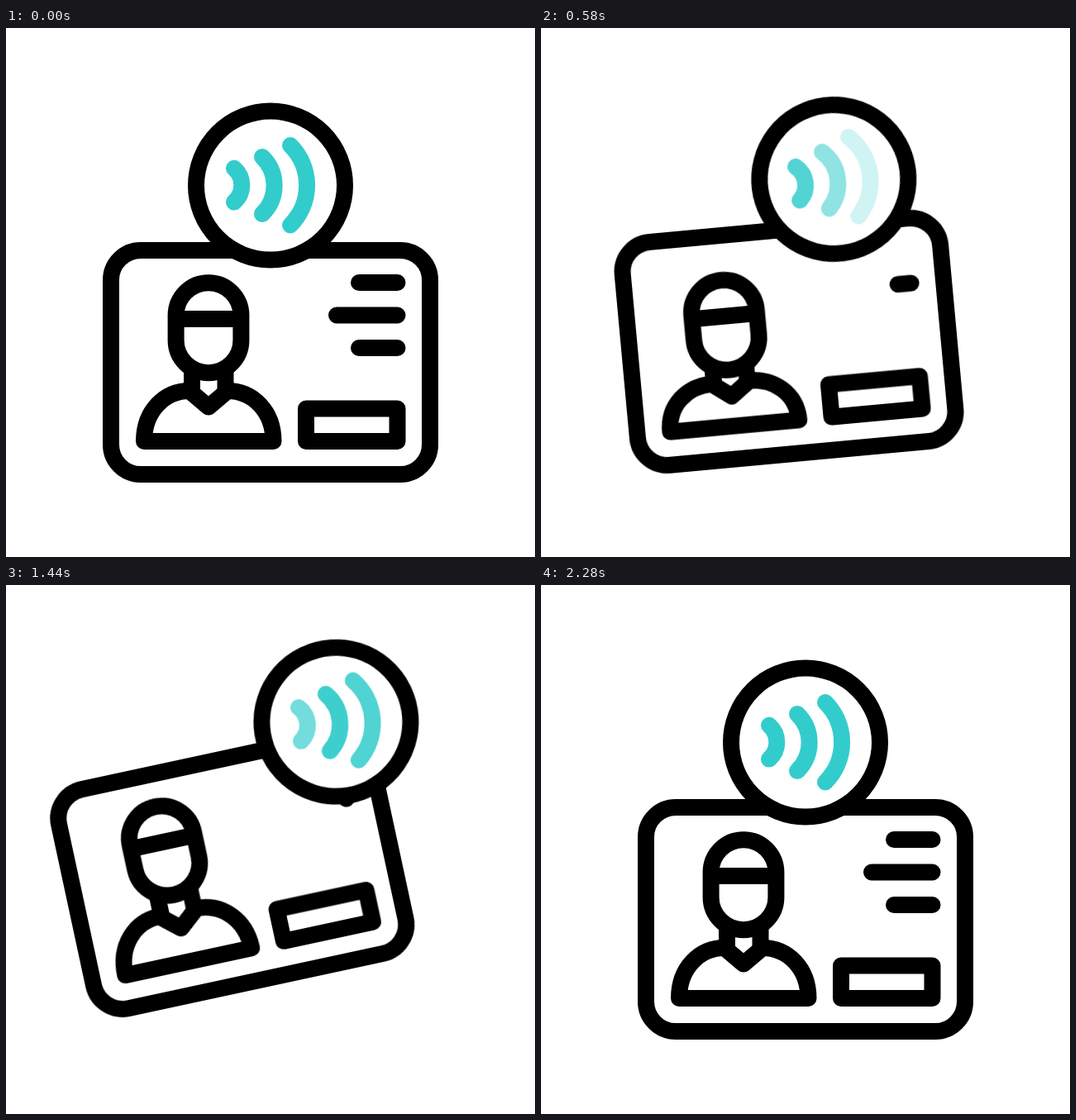
Recreate the animation shown at these times as an HTML page without scripts. Size 640x640 px, loop 2.4 s.

```html
<!DOCTYPE html>
<html lang="en">
<head>
<meta charset="utf-8">
<title>Contactless ID card</title>
<style>
  html, body { margin: 0; height: 100%; overflow: hidden; background: #fff; }
  svg { display: block; width: 100vw; height: 100vh; }

  .ink { fill: none; stroke: #000; stroke-width: 20; stroke-linecap: round; stroke-linejoin: round; }
  .solid { fill: #fff; }
  .butt { stroke-linecap: butt; }
  .waves { stroke: #33cccc; }

  .card, .slide, .float, .head, .body, .waves path, .lines path {
    animation: 2.4s infinite cubic-bezier(.36, 0, .64, 1);
  }
  .card, .slide { animation-timing-function: cubic-bezier(.63, 0, .37, 1); }
  .card { animation-name: tilt; transform-origin: 320px 404.5px; }
  .slide { animation-name: slide; }
  .float { animation-name: float; transform-origin: 320px 190.5px; }
  .head { animation-name: nod; }
  .body { animation-name: squash; transform-origin: 245px 500px; vector-effect: non-scaling-stroke; }
  .waves path { animation-name: pulse; animation-timing-function: cubic-bezier(.3, .15, .7, .85); }
  .waves path:nth-child(2) { animation-delay: .09s; }
  .waves path:nth-child(3) { animation-delay: .18s; }
  .lines path { stroke-dasharray: 1 2; }
  .lines path:nth-child(1) { animation-name: wipe-top; }
  .lines path:nth-child(2) { animation-name: wipe-middle; }
  .lines path:nth-child(3) { animation-name: wipe-bottom; }

  @keyframes tilt {
    0%, .83%, 94.8%, 100% { transform: translate(0, 0) rotate(0deg); }
    50.83%, 51.46% { transform: translate(-48.3px, -60.5px) rotate(-12.7deg); }
  }
  @keyframes slide {
    0%, .83%, 94.8%, 100% { transform: translateX(0); }
    50.83%, 51.46% { transform: translateX(83px); }
  }
  @keyframes float {
    0%, 89.25%, 100% { transform: translateY(0) rotate(0deg); }
    14.17% { transform: translateY(50.5px) rotate(-14deg); }
    31% { transform: translateY(-39px) rotate(-3.6deg); }
    45% { transform: translateY(50.5px) rotate(5.6deg); }
    59.38% { transform: translateY(-25px) rotate(-4.2deg); }
    74.38% { transform: translateY(11px) rotate(4.3deg); }
  }
  @keyframes nod {
    0%, 59%, 100% { transform: translateY(0); }
    12%, 45% { transform: translateY(14.7px); }
  }
  @keyframes squash {
    0%, 50%, 100% { transform: scaleY(1); }
    12%, 35% { transform: scaleY(.87); }
  }
  @keyframes pulse {
    0%, 2%, 26.9%, 55.2%, 82.9%, 100% { opacity: 1; }
    12.9%, 40.6%, 69.2% { opacity: 0; }
  }
  @keyframes wipe-top {
    0%, 5%, 85.2%, 100% { stroke-dashoffset: 0; }
    15%, 74.4% { stroke-dashoffset: 1.001; }
  }
  @keyframes wipe-bottom {
    0%, 11%, 78.1%, 100% { stroke-dashoffset: 0; }
    21%, 67.3% { stroke-dashoffset: 1.001; }
  }
  @keyframes wipe-middle {
    0%, 17.3%, 70.4%, 100% { stroke-dashoffset: 0; }
    27.3%, 59.6% { stroke-dashoffset: 1.001; }
  }
</style>
</head>
<body>
<svg viewBox="0 0 640 640">
  <g class="card ink">
    <rect x="127" y="269" width="386" height="271" rx="36"/>
    <rect x="363" y="460.5" width="110.5" height="39.5"/>
    <g class="lines">
      <path pathLength="1" d="M473.5 308H427"/>
      <path pathLength="1" d="M473.5 347.5H400"/>
      <path pathLength="1" d="M473.5 387H427"/>
    </g>
    <path class="butt" d="M225 412V444M265.5 412V444"/>
    <path class="body" d="M167 500C167 463 192 439 222 439L245 458.5L268 439C298 439 323.5 463 323.5 500Z"/>
    <g class="head">
      <rect class="solid" x="205.6" y="308.2" width="78.8" height="109" rx="39.4"/>
      <path class="butt" d="M206 352H284"/>
    </g>
  </g>
  <g class="slide">
    <g class="float ink">
      <circle class="solid" cx="320" cy="190.5" r="90"/>
      <g class="waves">
        <path d="M276 169.8A27 27 0 0 1 276 210.6"/>
        <path d="M310 156A48 48 0 0 1 310 225"/>
        <path d="M344 142A68 68 0 0 1 344 238.5"/>
      </g>
    </g>
  </g>
</svg>
</body>
</html>
```
